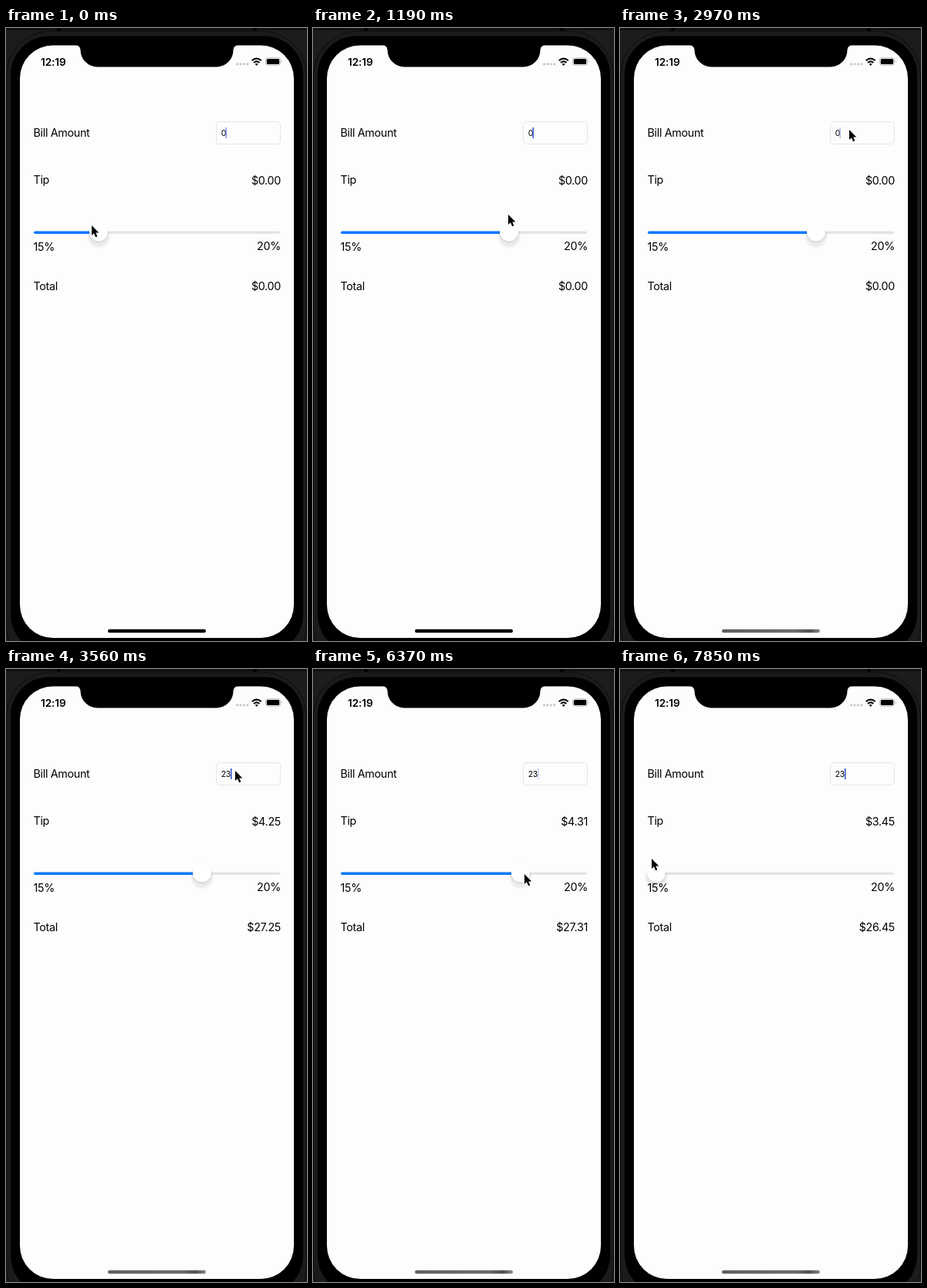
An HTML page for the animation above (8000 ms loop, 390 by 795 pixels).

```html
<!DOCTYPE html>
<html lang="en">
<head>
<meta charset="utf-8">
<title>Tip calculator</title>
<style>
  html, body { margin: 0; height: 100%; overflow: hidden; background: #1c1c1d; }
  svg { display: block; width: 390px; height: 795px; }
  text { font: 14.3px Inter, sans-serif; letter-spacing: -.3px; fill: #000; }
  .right { text-anchor: end; }
  .field { font-size: 10.5px; }
  .clock { font-size: 13.6px; font-weight: 600; letter-spacing: -.1px; }
</style>
</head>
<body>
<svg viewBox="0 0 390 795">
  <defs>
    <linearGradient id="dim">
      <stop offset="0" stop-color="#606060"/>
      <stop offset=".75" stop-color="#6c6c6c"/>
      <stop offset=".9" stop-color="#505050"/>
      <stop offset="1" stop-color="#8a8a8a"/>
    </linearGradient>
    <filter id="soft" x="-50%" y="-50%" width="200%" height="200%"><feGaussianBlur stdDeviation="1"/></filter>
  </defs>

  <!-- device -->
  <path d="M0 1.5H390" stroke="#111" stroke-width="3"/>
  <path d="M66 2.5h5M320 2.5h5" stroke="#000" stroke-width="5"/>
  <rect x=".5" y="4" width="389" height="830" rx="58" fill="#1b1b1b" stroke="#0c0c0c"/>
  <rect x="6" y="10.500" width="379" height="800" rx="50"/>
  <rect x="18" y="22.500" width="355" height="768.500" rx="43" fill="#fdfdfd"/>
  <path d="M90 22a6.500 6.500 0 0 1 6.500 6.500a22 22 0 0 0 22 22h154a22 22 0 0 0 22-22a6.500 6.500 0 0 1 6.500-6.500z"/>

  <!-- status bar -->
  <text class="clock" x="45" y="49">12:19</text>
  <path d="M299.500 46.800h14" stroke="#c8c8ca" stroke-width="3.200" stroke-linecap="round" stroke-dasharray="0 4.430"/>
  <path d="M318.700 42.300q6-5.400 12 0M321 45q3.700-3.200 7.400 0" fill="none" stroke="#000" stroke-width="2"/>
  <path d="M322.700 46.800q2-1.500 4 0l-2 2.100z"/>
  <rect x="336.500" y="38.700" width="19" height="9.600" rx="2.600" fill="none" stroke="#aaa" stroke-width=".8"/>
  <rect x="337.800" y="40" width="16.400" height="7" rx="1.500"/>
  <path d="M357 42q1.700 1.500 0 3z" fill="#999"/>

  <!-- form -->
  <text x="35.500" y="141">Bill Amount</text>
  <rect x="272.500" y="121.500" width="83" height="29" rx="4.500" fill="#fdfdfd" stroke="#e5e5e7"/>
  <text class="field" id="amount" x="278.700" y="139.700"></text>
  <rect id="caret" y="129" width="1.500" height="14" fill="#2f55d4"/>
  <text x="35.500" y="202">Tip</text>
  <text class="right" id="tip" x="356" y="203"></text>
  <rect x="36" y="263.400" width="319" height="3.600" rx="1.800" fill="#e4e4e5"/>
  <rect id="fill" x="36" y="263.400" height="3.600" rx="1.800" fill="#0a7aff"/>
  <g id="thumb">
    <circle cy="6" r="14" fill-opacity=".065" filter="url(#soft)"/>
    <circle cy="1.500" r="12" fill-opacity=".13" filter="url(#soft)"/>
    <circle r="12" fill="#fff"/>
  </g>
  <text x="35.500" y="289">15%</text>
  <text class="right" x="356" y="288">20%</text>
  <text x="35.500" y="339.500">Total</text>
  <text class="right" id="total" x="356" y="339.500"></text>
  <rect id="home" x="132" y="779.800" width="127" height="4.400" rx="2.200"/>

  <path id="pointer" d="M0 0V15L3.400 11.900L5.900 17.500L8.500 16.400L6.100 10.900H10.800Z"
        stroke="#fff" stroke-width="2" stroke-linejoin="round" paint-order="stroke"/>
</svg>
<script>
const LOOP = 8000, STEP = LOOP / 54;
const THUMB_MIN = 47, THUMB_RANGE = 296;
const $ = id => document.getElementById(id);
const clamp = v => Math.max(0, Math.min(1, v));
const money = v => '$' + v.toFixed(2);

// Eased progress from 0 to 1 between two times
function ease(t, from, to) {
  const u = clamp((t - from) / (to - from));
  return u * u * (3 - 2 * u);
}

// Each term is one drag of the slider
const thumbX = t => 120 - 18 * ease(t, 0, 300) + 152 * ease(t, 300, 1040)
  + 89 * ease(t, 6100, 7140) - THUMB_RANGE * ease(t, 7140, 7780);

// The pointer rides on the thumb, plus its own trips to the field and back
const pointerX = t => thumbX(t) - 9 + 8 * ease(t, 300, 1040) + 44 * ease(t, 1190, 2070)
  + 15 * ease(t, 4100, 4600) - 78 * ease(t, 4930, 5640) + 25 * ease(t, 5640, 5930)
  - 11 * ease(t, 7140, 7780);
const pointerY = t => 256 - 14 * ease(t, 600, 1190) - 110 * ease(t, 1190, 2070)
  + 33 * ease(t, 4100, 4600) + 101 * ease(t, 4900, 5340) - 20 * ease(t, 7140, 7780);

// Typing keeps the caret lit and restarts its blink
function caretOpacity(t) {
  if (t > 3250 && t < 4100) return 1;
  const phase = (t < 3250 ? t : t - 420) / 1000;
  return clamp(1.2 - 1.25 * Math.cos(2 * Math.PI * (phase - .83)));
}

function draw(now) {
  const t = Math.floor((now % LOOP + 5) / STEP) * STEP % LOOP;
  const thumb = thumbX(t);
  const bill = t < 3250 ? 0 : t < 3550 ? 2 : 23;
  const tip = bill * (.15 + .05 * (thumb - THUMB_MIN) / THUMB_RANGE);

  $('amount').textContent = bill;
  $('tip').textContent = money(tip);
  $('total').textContent = money(bill + tip);
  $('caret').setAttribute('x', bill > 9 ? 291 : 284.5);
  $('caret').setAttribute('opacity', caretOpacity(t));
  $('fill').setAttribute('width', thumb - 36);
  $('thumb').setAttribute('transform', `translate(${thumb} 264.5)`);
  $('pointer').setAttribute('transform', `translate(${pointerX(t)} ${pointerY(t)}) scale(.87)`);
  $('home').setAttribute('fill', t < 1750 ? '#000' : 'url(#dim)');
}

const start = performance.now();
(function tick() {
  draw(performance.now() - start);
  requestAnimationFrame(tick);
})();
</script>
</body>
</html>
```
